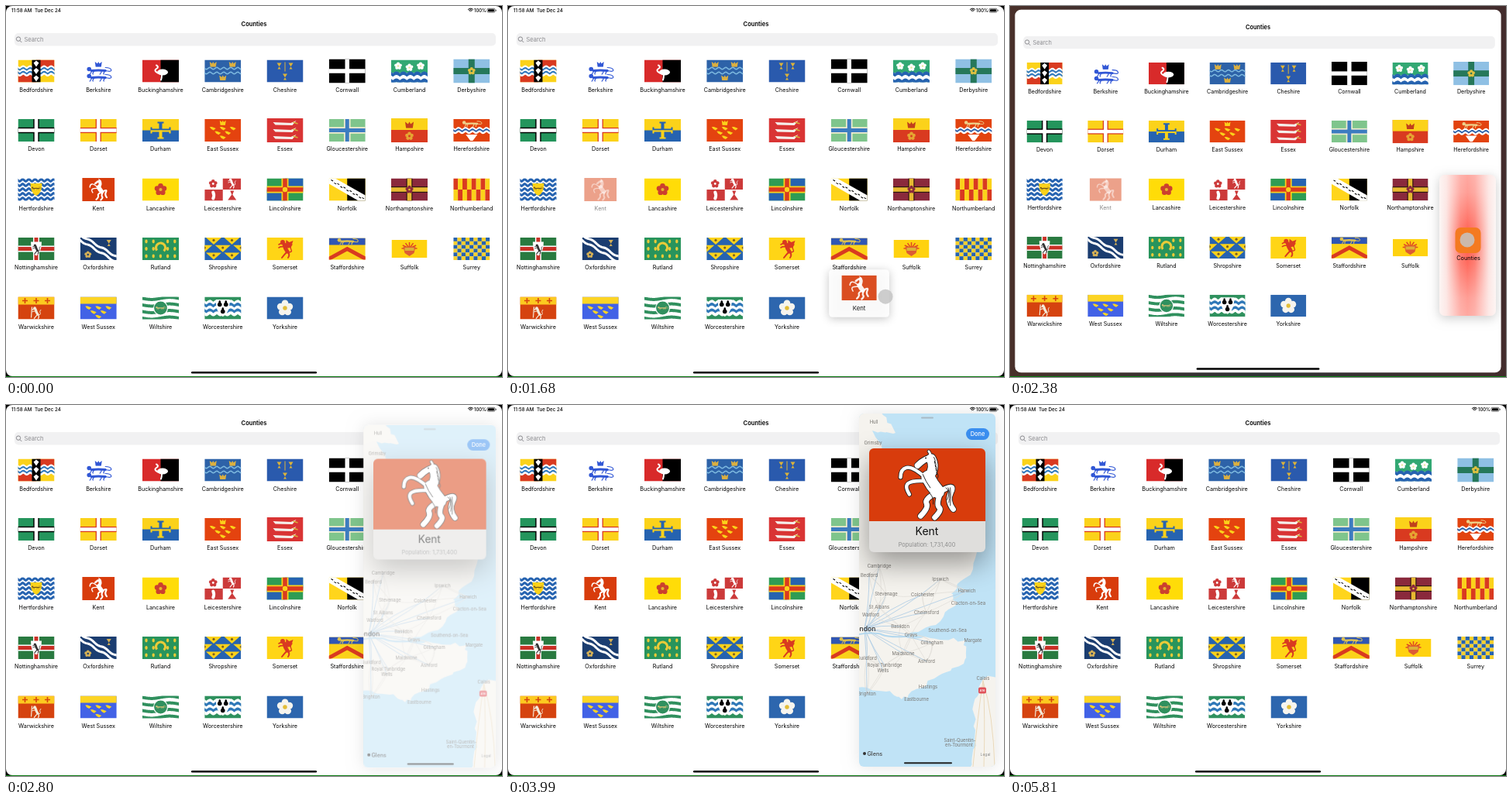
Animation of 640x479 px, one loop 5.88 s. Source, as an HTML page with a canvas:

```html
<!DOCTYPE html>
<html lang="en">
<head>
<meta charset="utf-8">
<title>Counties</title>
<style>
html, body { margin: 0; width: 100%; height: 100%; overflow: hidden; background: #000; }
canvas { display: block; width: 640px; height: 479px; }
</style>
</head>
<body>
<canvas id="stage"></canvas>
<script>
const W = 640, H = 479, LOOP = 5880, STEP = 70;
const dpr = Math.max(1, window.devicePixelRatio || 1);
const FONT = 'Inter, "Open Sans", "Liberation Sans", sans-serif';
const BLUE = '#2663b0', RED = '#d93a20', GOLD = '#fbd21a', GREEN = '#24955c', WHITE = '#fff', BLACK = '#000';
const FW = 47, FH = 29, CX = FW / 2, CY = FH / 2;

const stage = document.getElementById('stage');
stage.width = W * dpr;
stage.height = H * dpr;
const main = stage.getContext('2d');
let c = main;

// ---- helpers ----
const clamp = v => Math.min(1, Math.max(0, v));
const lerp = (a, b, p) => a + (b - a) * p;
const prog = (t, a, b) => clamp((t - a) / (b - a));
const ease = u => u < .5 ? 4 * u ** 3 : 1 - 4 * (1 - u) ** 3;
const out = u => 1 - (1 - u) ** 3;
const times = (n, fn) => { for (let i = 0; i < n; i++) fn(i); };

let seed = 7;
const rnd = () => (seed = seed * 16807 % 2147483647) / 2147483647;

function rect(col, x, y, w, h) { c.fillStyle = col; c.fillRect(x, y, w, h); }

function round(col, x, y, w, h, r) {
  c.fillStyle = col;
  c.beginPath();
  c.roundRect(x, y, w, h, r);
  c.fill();
}

function dot(col, x, y, r, ry = r) {
  c.fillStyle = col;
  c.beginPath();
  c.ellipse(x, y, r, ry, 0, 0, 7);
  c.fill();
}

function trace(p) {
  c.beginPath();
  for (let i = 0; i < p.length; i += 2) c.lineTo(p[i], p[i + 1]);
}

function poly(col, ...p) { trace(p); c.fillStyle = col; c.fill(); }

function line(col, lw, ...p) { trace(p); c.strokeStyle = col; c.lineWidth = lw; c.stroke(); }

// A rounded stroke that bends smoothly past its inner points.
function limb(col, lw, p) {
  const n = p.length;
  c.lineCap = c.lineJoin = 'round';
  c.beginPath();
  c.moveTo(p[0], p[1]);
  for (let i = 2; i < n - 4; i += 2)
    c.quadraticCurveTo(p[i], p[i + 1], (p[i] + p[i + 2]) / 2, (p[i + 1] + p[i + 3]) / 2);
  c.quadraticCurveTo(p[n - 4], p[n - 3], p[n - 2], p[n - 1]);
  c.strokeStyle = col;
  c.lineWidth = lw;
  c.stroke();
}

function at(x, y, s, fn) {
  c.save();
  c.translate(x, y);
  c.scale(s, s);
  fn();
  c.restore();
}

function shaded(alpha, blur, dy, fn) {
  c.save();
  c.shadowColor = `rgba(0,0,0,${alpha})`;
  c.shadowBlur = blur * dpr;
  c.shadowOffsetY = dy * dpr;
  fn();
  c.restore();
}

function text(s, x, y, size, col = BLACK, align = 'center', weight = 400) {
  c.font = `${weight} ${size}px ${FONT}`;
  c.textAlign = align;
  c.fillStyle = col;
  c.fillText(s, x, y);
}

// ---- charges ----
const field = (col, h = FH) => rect(col, 0, 0, FW, h);

function quarters(a, b) {
  field(a);
  rect(b, CX, 0, CX, CY);
  rect(b, 0, CY, CX, CY);
}

function wave(col, y, lw, amp = 1.2, len = 9, slope = 0) {
  const p = [];
  for (let x = -2; x <= 50; x++) p.push(x, y + slope * x + amp * Math.sin(x * 2 * Math.PI / len));
  line(col, lw, ...p);
}

const waves = (n, y, gap, a, b) => times(n, i => wave(i % 2 ? b : a, y + i * gap, gap + .1));

function cross(col, w, h = FH) {
  rect(col, CX - w / 2, 0, w, h);
  rect(col, 0, h / 2 - w / 2, FW, w);
}

function rose(x, y, r, col, mid = GOLD) {
  times(5, i => {
    const a = i * Math.PI * .4 - Math.PI / 2;
    dot(col, x + Math.cos(a) * r * .58, y + Math.sin(a) * r * .58, r * .42);
  });
  dot(col, x, y, r * .5);
  dot(mid, x, y, r * .26);
}

function crown(x, y, s, col) {
  at(x, y, s, () => [-1, 0, 1].forEach(i => poly(col, -4, 3, 4, 3, i * 5, -4)));
}

// Four-legged walker facing left.
function passant(x, y, s, col) {
  at(x, y, s, () => {
    limb(col, 3, [-9, 0, 0, -1, 9, 0]);
    dot(col, -12, -2, 2.8);
    [-9, -5, 4, 9].forEach((lx, i) => limb(col, 1.3, [lx, 0, lx - i % 2 * 3, 3, lx - 2, 4.5]));
    limb(col, 1.2, [9, 0, 17, 2, 16, -4, 9, -4]);
  });
}

// Upright beast facing left.
function rampant(x, y, s, col) {
  at(x, y, s, () => {
    limb(col, 5, [3, 4, 0, 0, -1, -5]);
    dot(col, -3, -8, 3);
    [-6, -2].forEach(y => limb(col, 1.6, [-1, y, -5, y - 1, -8, y + 1]));
    [-3, 5].forEach(x => limb(col, 2, [3, 4, x + 2, 8, x - 1, 12]));
    limb(col, 1.4, [4, 5, 10, 5, 6, -2, 9, -5]);
  });
}

function bird(x, y, col) {
  poly(col, x - 4, y - 2, x - 1, y - 2, x + 4, y, x + 1, y + 2.4, x - 2, y + .8);
}

const birds = (col, y) => times(3, r => times(3 - r, i => bird(10.5 + 6.5 * r + i * 13, y + r * 5.8, col)));

function shield(col, w, h) {
  c.beginPath();
  c.moveTo(CX - w, CY - h);
  c.lineTo(CX + w, CY - h);
  c.quadraticCurveTo(CX + w, CY + h * .6, CX, CY + h);
  c.quadraticCurveTo(CX - w, CY + h * .6, CX - w, CY - h);
  c.fillStyle = col;
  c.fill();
}

function sheaf(x, y, col) {
  poly(col, x - 3, y - 4, x + 3, y - 4, x - 2, y + 4, x + 2, y + 4);
}

// Rearing horse: [width, points] per part, about 96 units tall.
const HORSE = [
  [7, [21, 7, 38, -2, 26, 22, 35, 33]],
  [4.5, [-3, -10, -20, -25, -36, -21, -36, -10]],
  [4.5, [-3, -5, -20, -6, -31, 2, -24, 13]],
  [7, [12, 11, -4, 19, 2, 31, -9, 42]],
  [7, [17, 13, 12, 27, 20, 34, 10, 44]],
  [18, [1, -10, 6, 0, 14, 9]],
  [13, [3, -12, 11, -24, 5, -35]],
  [8, [5, -36, -3, -36, -13, -26]],
  [3, [4, -39, 4, -43, 2, -45]]
];

function horse(x, y, s, fine) {
  at(x, y, s, () => {
    if (fine) HORSE.forEach(([w, p]) => limb('#222', w + 1.8, p));
    HORSE.forEach(([w, p]) => limb(WHITE, w, p));
    if (!fine) return;
    times(5, i => limb('#222', 1, [9 + i * .8, -37 + i * 5, 12 + i, -33 + i * 5, 10 + i, -29 + i * 5]));
    times(3, i => limb('#222', .9, [25 + i * 3, 4, 32, 8 + i * 3, 27 + i * 2, 20 + i * 4]));
    limb('#222', 1, [-6, -14, -2, -4, 4, 4]);
    limb('#222', 1, [4, 12, 9, 18, 8, 26]);
    dot('#222', -2, -36, 1);
  });
}

function kent(w, h, fine) {
  rect('#d83c0c', 0, 0, w, h);
  horse(w / 2, h / 2, h / 98, fine);
}

// ---- flags, 47 x 29 unless a size is given ----
const flags = [
  ['Bedfordshire', () => {
    quarters(GOLD, RED);
    waves(5, 9.5, 2.4, WHITE, '#2f7ac0');
    rect(BLACK, 18, 0, 11, FH);
    times(3, i => poly(WHITE, 20, 4 + i * 9.5, CX, 1 + i * 9.5, 27, 4 + i * 9.5, CX, 9 + i * 9.5));
  }],
  ['Berkshire', () => {
    field(WHITE);
    crown(CX, 6, .9, '#3157d5');
    [14, 23].forEach(y => passant(CX, y, 1, '#3157d5'));
  }],
  ['Buckinghamshire', () => {
    field('#d82a2a');
    rect(BLACK, CX, 0, CX, FH);
    dot(WHITE, 26, 16, 7, 4);
    limb(WHITE, 2, [20, 17, 14, 14, 22, 9, 18, 7]);
    limb(WHITE, 2, [25, 20, 25, 23, 24, 26]);
  }],
  ['Cambridgeshire', () => {
    field('#2d62a8');
    [11, 17].forEach(y => wave('#7db9df', y, 1.5));
    [[11, 6], [36, 6], [CX, 23.5]].forEach(([x, y]) => crown(x, y, .9, '#dcb040'));
  }],
  ['Cheshire', () => {
    field('#2a5aad');
    [[16, 8], [31, 8], [CX, 22]].forEach(([x, y]) => sheaf(x, y, '#dcb33a'));
    line('#dcb33a', 1, CX, 3, CX, 15);
  }],
  ['Cornwall', () => { field(BLACK, 31); cross(WHITE, 5.5, 31); }, FW, 31],
  ['Cumberland', () => {
    field('#32a873');
    times(3, i => rose(9 + i * 14.5, i % 2 ? 10 : 8, 5, WHITE, '#e7e8a0'));
    rect(WHITE, 0, 17, FW, 12);
    waves(3, 18.5, 4.5, BLUE, WHITE);
    wave(BLUE, 27, 2.3);
  }],
  ['Derbyshire', () => {
    field('#8fc0e4', 31);
    cross('#26785a', 8, 31);
    rose(CX, 15.5, 5, '#dfc040', '#26785a');
  }, FW, 31],
  ['Devon', () => { field(GREEN); cross(BLACK, 7.5); cross(WHITE, 4.6); }],
  ['Dorset', () => { field(GOLD); cross(RED, 7.2); cross(WHITE, 4.6); }],
  ['Durham', () => {
    field(GOLD);
    rect(BLUE, 0, CY, FW, CY);
    [[BLUE, -1], [GOLD, 1]].forEach(([col, d]) => at(CX, CY, 1, () => {
      c.scale(1, d);
      rect(col, -2, 0, 4, 10);
      rect(col, -4, 9, 8, 2);
      rect(col, -12, 0, 24, 2);
      [-13, 11].forEach(x => rect(col, x, 0, 2, 4));
    }));
  }],
  ['East Sussex', () => { field('#e4430f'); crown(CX, 5, .8, GOLD); birds(GOLD, 12); }],
  ['Essex', () => {
    field('#d93434', 31);
    times(3, i => {
      const y = 7 + i * 9;
      poly('#f5f0ec', 8, y - 2, 31, y - 1, 38, y - 4, 33, y + 2, 11, y + 1.5);
      line('#d8b038', 1.5, 34, y - 2, 40, y);
    });
  }, FW, 31],
  ['Gloucestershire', () => { field('#7fc58c'); cross('#f1edcf', 8.5); cross('#3c7cc0', 5); }],
  ['Hampshire', () => {
    field(RED, 31);
    rect(GOLD, 0, 0, FW, 15);
    crown(CX, 9, 1.1, '#c0401c');
    rose(CX, 23, 5.5, '#e6a532', RED);
  }, FW, 31],
  ['Herefordshire', () => {
    field('#e2430f');
    passant(CX, 6, .8, '#eed08a');
    waves(3, 12.5, 2.2, WHITE, BLUE);
    poly(WHITE, 16, 20, 31, 20, 25, 28, 22, 28);
  }],
  ['Hertfordshire', () => {
    field(WHITE);
    times(5, i => wave(BLUE, 2.5 + i * 6, 3, 1.3, 8));
    shield(GOLD, 7.5, 8);
    passant(CX, 13, .4, '#6f5418');
  }],
  ['Kent', () => kent(42, 30), 42, 30],
  ['Lancashire', () => { field('#ffdc08'); rose(CX, CY, 8, '#cc402e', '#e5b62c'); }],
  ['Leicestershire', () => {
    quarters(WHITE, '#cc3a3a');
    rose(11, 7, 5.5, '#cc3a3a', WHITE);
    rampant(35, 6, .55, WHITE);
    limb(WHITE, 4, [11, 18, 13, 22, 11, 26]);
    poly('#cc3a3a', 33, 16, 38, 16, 36, 21, 41, 28, 30, 28, 35, 21);
  }],
  ['Lincolnshire', () => {
    quarters('#2e9c54', BLUE);
    cross(GOLD, 9);
    cross(RED, 5.5);
    dot(GOLD, CX, CY, 3.2);
  }],
  ['Norfolk', () => {
    field('#ffd51c');
    rect(BLACK, CX, 0, CX, FH);
    poly(WHITE, 0, 0, 8, 0, FW, 22, FW, FH, 38, FH, 0, 7);
    times(11, i => {
      const x = 4 + i * 4, y = x * .57 + (i % 2 ? 2 : .5);
      line(BLACK, 1.1, x - 1.3, y - .7, x + 1.3, y + .8);
    });
  }],
  ['Northamptonshire', () => {
    field('#8a293c');
    cross('#2a1410', 8);
    cross('#e8b932', 5.6);
    rose(CX, CY, 5.2, '#8a293c', '#e8b932');
  }],
  ['Northumberland', () => times(16, i => {
    rect((i + (i >> 3)) % 2 ? GOLD : RED, i % 8 * FW / 8, (i >> 3) * CY, FW / 8 + .1, CY);
  })],
  ['Nottinghamshire', () => {
    field('#297a40');
    cross(WHITE, 8);
    cross('#c93026', 5);
    shield(WHITE, 7, 9);
    rampant(CX, CY, .55, '#333');
  }],
  ['Oxfordshire', () => {
    field('#1b3d70');
    [0, 7].forEach(d => wave(WHITE, d - 3.5, 3, 1, 18, .6));
    sheaf(37, 7, '#d4b056');
    rose(10, 22, 4.5, '#d4b056', '#1b3d70');
  }],
  ['Rutland', () => {
    field('#28945c');
    c.beginPath();
    c.arc(CX, 13, 6, 2.5, 7.1);
    c.strokeStyle = '#eacb38';
    c.lineWidth = 3.2;
    c.stroke();
    times(15, i => {
      const x = 5 + i % 5 * 9.2, row = i / 5 | 0;
      if (Math.abs(x - CX) > 8 || row === 2) dot('#eacb38', x, 5 + row * 9.5, 1.7, 2.4);
    });
  }],
  ['Shropshire', () => {
    field(BLUE);
    times(3, r => times(4 - r, i => {
      const x = (r - 1) * 11.75 + i * 23.5, y = r * 9.7;
      poly(GOLD, x - 10, y, x + 10, y, x, y + 9);
      dot('#7a6020', x, y + 3.4, 1.6);
    }));
  }],
  ['Somerset', () => {
    field('#ffd516');
    rampant(CX, 14, 1, RED);
    poly(RED, 24, 14, 25, 3, 29, 6, 34, 4, 31, 13);
  }],
  ['Staffordshire', () => {
    field(GOLD);
    rect('#3056b4', 0, 0, FW, 9);
    passant(CX, 4.5, .85, '#dcc050');
    line(RED, 5, -4, 29, CX, 14, 51, 29);
  }, FW, 28],
  ['Suffolk', () => {
    rect('#ffd20f', 0, 0, 46, 23);
    times(7, i => {
      const a = Math.PI * (1 + i / 6);
      line('#de4a22', 1.5, 23, 11, 23 + 10 * Math.cos(a), 11 + 8 * Math.sin(a));
    });
    poly('#dc5c34', 15, 9, 31, 9, 29, 17, 23, 21, 17, 17);
    rect('#dcb038', 17, 10, 12, 4);
  }, 46, 23],
  ['Surrey', () => times(54, i => {
    const x = i % 9, y = i / 9 | 0;
    rect((x + y) % 2 ? '#f8d02c' : BLUE, x * FW / 9, y * FH / 6, 5.3, 4.9);
  })],
  ['Warwickshire', () => {
    field('#d5430f');
    rect('#fcca20', 0, 0, FW, 10);
    times(3, i => {
      const x = 9 + i * 14.5;
      line('#d5430f', 1.6, x, 1.5, x, 8.5);
      line('#d5430f', 1.6, x - 3.5, 5, x + 3.5, 5);
    });
    rampant(CX, 20, .65, '#f3ead9');
    line('#f3ead9', 1.2, 18, 13, 17, 27);
  }],
  ['West Sussex', () => { field('#4262e6'); rect('#fcd424', 0, 0, FW, 9); birds('#fcd424', 14); }],
  ['Wiltshire', () => {
    field(WHITE);
    times(4, i => wave('#30905e', 2 + i * 8.5, 4, 1.4, FW));
    dot(WHITE, CX, CY, 9.5);
    dot('#30905e', CX, CY, 8.4);
    passant(CX, CY, .42, '#d3c27b');
  }],
  ['Worcestershire', () => {
    field('#2f915e');
    waves(5, 7, 3.7, WHITE, '#2f78b8');
    shield(WHITE, 9, 11);
    [[19.5, 9], [27.5, 9], [CX, 18]].forEach(([x, y]) => {
      dot(BLACK, x, y + 1, 2.8);
      dot(BLACK, x, y - 2, 1.4, 2.5);
    });
  }],
  ['Yorkshire', () => { field('#2d66ae'); rose(CX, CY, 10.5, '#f6f4ee', '#e2bd38'); }]
];
const kentFlag = flags.find(f => f[0] === 'Kent');

function county([name, draw, w = FW, h = FH], x, y) {
  c.save();
  c.translate(x - w / 2, y - h / 2);
  c.beginPath();
  c.rect(0, 0, w, h);
  c.clip();
  draw();
  c.restore();
  text(name, x, y + 26.6, 7.2);
}

// ---- app window ----
function statusBar() {
  text('11:58 AM', 7, 8, 6.2, BLACK, 'left', 500);
  text('Tue Dec 24', 37, 8, 6.2, BLACK, 'left', 500);
  text('100%', 604, 8, 5.9, BLACK, 'left', 500);
  c.strokeStyle = BLACK;
  c.lineWidth = 1;
  times(3, i => { c.beginPath(); c.arc(599.5, 8, 1.6 * (i + 1), 3.9, 5.5); c.stroke(); });
  c.lineWidth = .6;
  c.beginPath();
  c.roundRect(621, 3.3, 10, 4.8, 1.4);
  c.stroke();
  round(BLACK, 622, 4.2, 8, 3, .7);
  rect(BLACK, 631.7, 4.8, .8, 1.8);
}

function appWindow(shrink, kentAlpha) {
  at(320, 239, 1 - .02 * shrink, () => {
    c.translate(-320, -239);
    round(WHITE, 0, 0, 640, 478, 8);
    c.globalAlpha = 1 - shrink;
    statusBar();
    c.globalAlpha = 1;
    text('Counties', 320, 25.6, 7.6, BLACK, 'center', 600);
    round('#f1f1f2', 11, 35, 621, 16.5, 5);
    c.strokeStyle = '#8a8a8e';
    c.lineWidth = 1;
    c.beginPath();
    c.arc(16, 42.6, 2.7, 0, 7);
    c.moveTo(18, 44.7);
    c.lineTo(20.3, 47);
    c.stroke();
    text('Search', 23.5, 46, 7.5, '#8a8a8e', 'left');
    flags.forEach((f, i) => {
      c.globalAlpha = f === kentFlag ? kentAlpha : 1;
      county(f, 39 + i % 8 * 80.25, 84 + (i / 8 | 0) * 76.5);
    });
    c.globalAlpha = 1;
    round(BLACK, 239, 472, 162, 2.4, 1.2);
  });
}

// ---- detail panel ----
const PX = 453, PY = 11, PW = 176, PH = 456;
const EAST = [[440, 0], [480, 8], [500, 36], [470, 33], [500, 90], [488, 126], [580, 122], [608, 170], [600, 212],
  [572, 244], [580, 256], [552, 284], [508, 298], [545, 301], [590, 304], [588, 334], [560, 347], [526, 367],
  [508, 380], [488, 370], [440, 362]];
const FRANCE = [[660, 340], [613, 354], [601, 385], [604, 440], [592, 480], [660, 480]];
const TOWNS = [
  ['Cambridge', 479, 208], ['Bedford', 466, 220], ['Ipswich', 558, 225], ['Harwich', 592, 240], ['Stevenage', 488, 244],
  ['Colchester', 535, 245], ['St Albans', 479, 261], ['Chelmsford', 540, 268], ['Watford', 468, 271],
  ['Basildon', 506, 286], ['Grays', 520, 297], ['Gillingham', 547, 307], ['Guildford', 463, 327],
  ['Maidstone', 510, 321], ['Ashford', 540, 331], ['Royal Tunbridge', 486, 336], ['Wells', 484, 343],
  ['Brighton', 463, 373], ['Margate', 600, 304], ['Hastings', 542, 364], ['Clacton-on-Sea', 594, 256],
  ['Southend-on-Sea', 567, 291], ['Eastbourne', 527, 380], ['Calais', 613, 353], ['Hull', 472, 22], ['Grimsby', 471, 49],
  ['Saint-Quentin-', 583, 433], ['en-Tourmont', 582, 439]
];
const INLAND = TOWNS.slice(0, 18);

// Coast through key points, with small seeded bays between them.
function land(points) {
  c.beginPath();
  points.forEach(([x, y], i) => {
    const [nx, ny] = points[(i + 1) % points.length];
    c.lineTo(x, y);
    for (let k = 1; k < 6; k++)
      c.lineTo(lerp(x, nx, k / 6) + rnd() * 5 - 2.5, lerp(y, ny, k / 6) + rnd() * 5 - 2.5);
  });
  c.fillStyle = '#f5f3ee';
  c.fill();
}

// Each town is joined to its nearest neighbours and to the capital.
function roads() {
  const far = (a, b) => Math.hypot(a[1] - b[1], a[2] - b[2]);
  INLAND.forEach((a, i) => {
    const near = [...INLAND].sort((p, q) => far(a, p) - far(a, q)).slice(1, 4);
    [...near, ['London', 460, 289]].forEach((b, k) => {
      const mx = (a[1] + b[1]) / 2 + rnd() * 14 - 7, my = (a[2] + b[2]) / 2 + rnd() * 14 - 7;
      limb(k === 3 ? '#b4d0e6' : '#e0ddd7', k === 3 ? .9 : .7, [a[1], a[2], mx, my, b[1], b[2]]);
    });
  });
  times(3, i => limb('#ead9bb', 1, [613, 356, 606 + i * 10, 400, 600 + i * 14, 467]));
}

function mapView() {
  rect('#c0e3f6', PX, PY, PW, PH);
  land(EAST);
  land(FRANCE);
  roads();
  limb('#b4d8ee', 2, [453, 296, 475, 293, 490, 300, 512, 299]);
  TOWNS.forEach(([s, x, y]) => text(s, x, y + 2, 5.9, '#77746f'));
  text('London', 459, 292, 8.6, '#333', 'center', 500);
  round('#e0525a', 607, 364.5, 10, 8, 2);
  text('A16', 612, 370.4, 4, WHITE, 'center', 600);
  dot('#333', 460, 450, 2);
  text('Glens', 463.5, 452.8, 7.2, '#444', 'left', 500);
  text('Legal', 616, 453, 5, '#888');
}

function panelArt() {
  mapView();
  round('#a9b9c4', 533, 15.5, 16, 2, 1);
  round('#3b8ff0', 591, 30, 30, 15, 7.5);
  text('Done', 606, 40.2, 7.4, WHITE, 'center', 500);
  shaded(.4, 36, 14, () => round('#dfdedc', 466, 56, 150, 134, 6));
  c.save();
  c.beginPath();
  c.roundRect(466, 56, 150, 94, [6, 6, 0, 0]);
  c.clip();
  c.translate(466, 56);
  kent(150, 94, true);
  c.restore();
  text('Kent', 540.5, 168.3, 14, '#111');
  text('Population: 1,731,400', 540.5, 183.4, 7.35, '#8b8b8b');
  round('#222', 511, 461.3, 62, 2, 1);
}

function makePanel() {
  const cv = document.createElement('canvas');
  cv.width = PW * dpr;
  cv.height = PH * dpr;
  c = cv.getContext('2d');
  c.scale(dpr, dpr);
  c.translate(-PX, -PY);
  c.beginPath();
  c.roundRect(PX, PY, PW, PH, 6);
  c.clip();
  panelArt();
  c = main;
  return cv;
}
const panel = makePanel();

function slideOver(t) {
  if (t < 2520 || t > 5400) return;
  const k = 1 - ease(prog(t, 2520, 3042));
  const leave = prog(t, 4800, 5400);
  const fade = prog(t, 2520, 2680) * (1 - leave);
  const grow = 1 + .07 * leave;
  c.save();
  c.translate(55 * k, 38 * k);
  c.scale(1 - .075 * k, 1 - .075 * k);
  c.translate(541, 239);
  c.scale(grow, grow);
  c.translate(-541, -239);
  c.globalAlpha = fade;
  if (leave) c.filter = `blur(${3 * leave * dpr}px)`;
  else shaded(.1, 20, 0, () => round(WHITE, PX, PY, PW, PH, 6));
  c.globalAlpha = fade * prog(t, 2650, 2950);
  c.drawImage(panel, PX, PY, PW, PH);
  c.restore();
}

// ---- drag and drop ----
function finger(t) {
  const a = ease(prog(t, 1200, 1803)), b = ease(prog(t, 1803, 2150));
  return [lerp(lerp(119, 500, a), 590, b), lerp(lerp(237, 380, a), 302, b)];
}

function preview(t) {
  const show = prog(t, 700, 820) * (1 - prog(t, 2150, 2260));
  if (!show) return;
  const [x, y] = finger(t - 66);
  at(x, y + 1.5, 1 + .08 * out(prog(t, 700, 1000)), () => {
    c.globalAlpha = show * .9;
    shaded(.25, 12, 2, () => round(WHITE, -36, -22, 72, 57, 4));
    county(kentFlag, 0, 0);
  });
  c.globalAlpha = 1;
}

function dropZone(t) {
  const a = prog(t, 2150, 2290) * (1 - prog(t, 2480, 2680));
  if (!a) return;
  const p = out(prog(t, 2150, 2350)), q = ease(prog(t, 2480, 2680));
  const [x, y, w, h] = [[552, 554, 474], [270, 218, 48], [78, 73, 163], [62, 182, 422]]
    .map(([s, m, e]) => lerp(lerp(s, m, p), e, q));
  c.save();
  c.globalAlpha = a;
  shaded(.2, 14, 3, () => round('#fbf8f7', x, y, w, h, 7));
  const glow = c.createLinearGradient(x, 0, x + w, 0);
  const veil = c.createLinearGradient(0, y, 0, y + h);
  times(9, i => {
    const v = Math.sin(Math.PI * i / 8) ** 2;
    glow.addColorStop(i / 8, `rgba(255,88,74,${v * .95})`);
    veil.addColorStop(i / 8, `rgba(255,240,238,${(1 - v) * .5})`);
  });
  round(glow, x, y, w, h, 7);
  round(veil, x, y, w, h, 7);
  round('#f47a20', x + w / 2 - 16, y + h / 2 - 23, 33, 33, 7);
  text('Counties', x + w / 2 + 1, y + h / 2 + 18.7, 7.3);
  c.restore();
}

function touch(t) {
  const a = prog(t, 560, 680) * (1 - prog(t, 2440, 2540));
  if (!a) return;
  const [x, y] = finger(t);
  c.globalAlpha = a * .85;
  dot('#c4c4c4', x, y, 9.5);
  c.globalAlpha = 1;
}

function backdrop(shrink) {
  rect(BLACK, 0, 0, W, H);
  if (!shrink) return;
  const g = c.createLinearGradient(0, 0, W, 0);
  ['#49302a', '#303236', '#432c2c'].forEach((col, i) => g.addColorStop(i / 2, col));
  c.globalAlpha = shrink;
  rect(g, 0, 0, W, H);
  c.globalAlpha = 1;
}

function draw(t) {
  const shrink = out(prog(t, 2080, 2330)) * (1 - ease(prog(t, 2480, 2740)));
  c.setTransform(dpr, 0, 0, dpr, 0, 0);
  c.lineCap = 'butt';
  backdrop(shrink);
  appWindow(shrink, 1 - .52 * prog(t, 1100, 1300) * (1 - prog(t, 2500, 2700)));
  preview(t);
  dropZone(t);
  slideOver(t);
  touch(t);
  rect('#0b7a12', 0, 478, W, 1);
}

const begin = performance.now();
function frame() {
  const t = (performance.now() - begin) % LOOP;
  draw(Math.floor(t / STEP) * STEP);
  requestAnimationFrame(frame);
}
frame();
</script>
</body>
</html>
```
